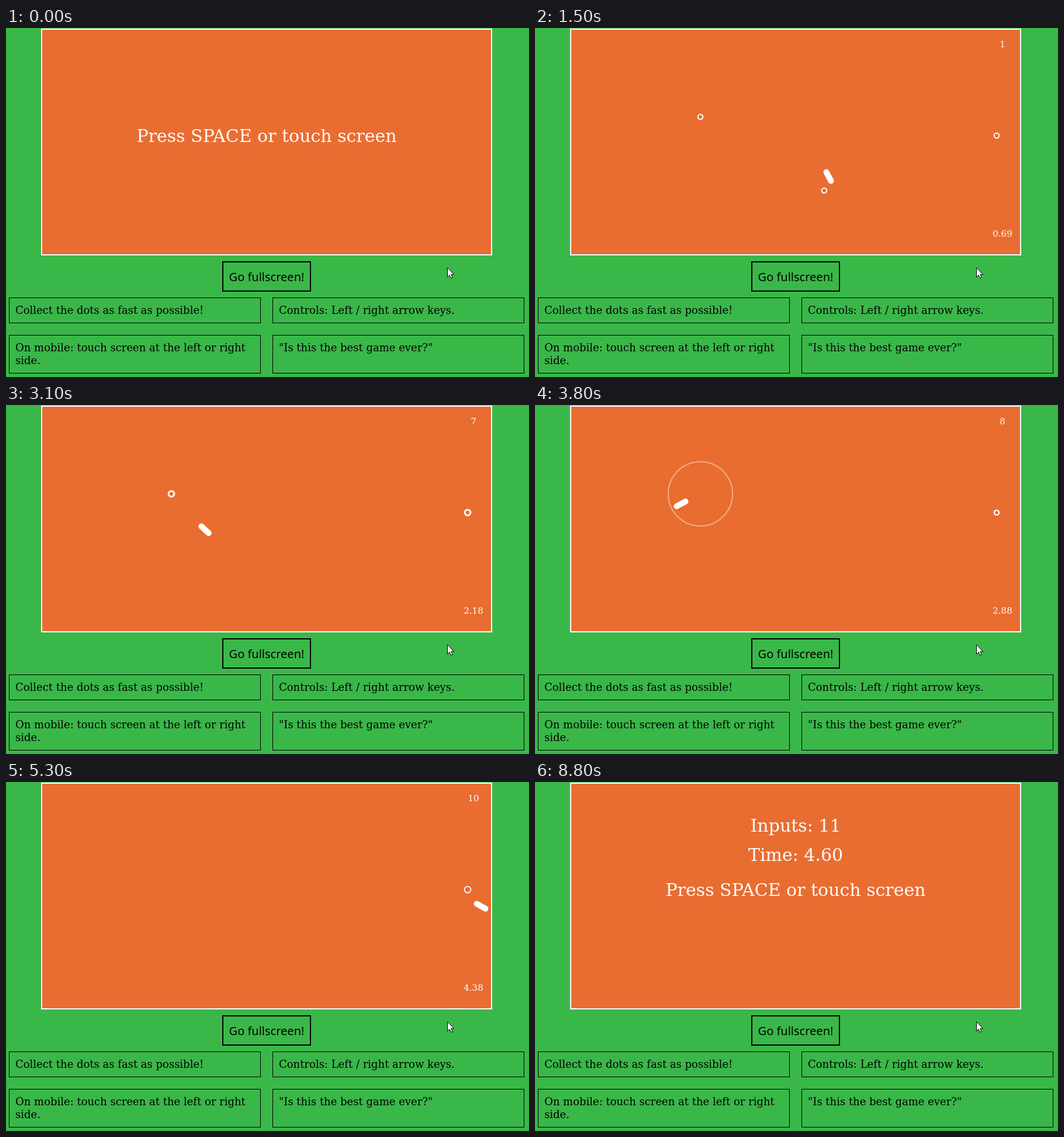
These frames come from a looping animation (895 by 597 pixels, 9.5 s). An HTML page:

```html
<!DOCTYPE html>
<html lang="en">
<head>
<meta charset="utf-8">
<title>Collect the dots</title>
<style>
  html, body { margin: 0; width: 100%; height: 100%; overflow: hidden; background: #3ab749; }
  svg { display: block; width: 895px; height: 597px; }
  text { font-family: "DejaVu Serif", serif; white-space: pre; }
  .page text { font-size: 18px; }
  .page rect { fill: none; stroke: #000; }
  .page .button { font: 20px "Noto Sans", sans-serif; text-anchor: middle; }
  .game text { fill: #fff; text-anchor: middle; }
  .big { font-size: 30px; }
  .small { font-size: 15px; }
  .white { fill: none; stroke: #fff; }
</style>
</head>
<body>
<svg viewBox="0 0 895 597">
  <defs><clipPath id="field"><rect x="62" y="3" width="768" height="384"/></clipPath></defs>
  <rect width="895" height="597" fill="#3ab749"/>
  <rect x="61" y="2" width="770" height="386" fill="#e96d31" stroke="#fff" stroke-width="2"/>

  <g class="game" clip-path="url(#field)">
    <g id="menu" class="big">
      <g id="result">
        <text x="446" y="85">Inputs: 11</text>
        <text x="446" y="135">Time: 4.60</text>
      </g>
      <text x="446" y="195">Press SPACE or touch screen</text>
    </g>
    <g id="play">
      <g id="dots" class="white"></g>
      <g id="player" class="white" stroke-width="10" stroke-linecap="round">
        <path d="M-8.5 0H8.5"/><path d="M-8.5 0H8.5"/>
      </g>
      <text id="inputs" class="small" x="800" y="33"></text>
      <text id="clock" class="small" x="800" y="357"></text>
    </g>
  </g>

  <g class="page">
    <rect x="371" y="400" width="150" height="50" stroke-width="2"/>
    <text class="button" x="446" y="433">Go fullscreen!</text>
    <rect x="5.5" y="461.5" width="430" height="43"/>
    <text x="16" y="489">Collect the dots as fast as possible!</text>
    <rect x="456.5" y="461.5" width="430" height="43"/>
    <text x="467" y="489">Controls: Left / right arrow keys.</text>
    <rect x="5.5" y="525.5" width="430" height="65"/>
    <text x="16" y="553">On mobile: touch screen at the left or right</text>
    <text x="16" y="575">side.</text>
    <rect x="456.5" y="525.5" width="430" height="65"/>
    <text x="467" y="553">"Is this the best game ever?"</text>
  </g>
  <path id="cursor" d="M.5 .5V16.6L4.1 13.2L6.7 18.6L9.2 17.4L6.7 12.2H11.6Z" fill="#fff" stroke="#000"/>
</svg>
<script>
const LOOP = 9500, STEP = 100, START = 900, OVER = 6600, FINISH = 4.6;
const WIDTH = 768, LEFT = 62;
const $ = id => document.getElementById(id);

// Drive segments: end time (s), length (px), turn (rad)
const drive = [
  [0.12, 0, 0], [0.41, 45, 1.08], [0.69, 42, 0],
  [1.385, 116, 2.81], [2.18, 133, 0],
  [2.544, 57, 0], [2.87, 51, -1.24], [3.48, 96.3, 0],
  [3.793, 46.6, 0], [4.067, 41, 1], [4.41, 51.6, 0], [FINISH, 25, 0.55]
];
const presses = [0.12, 0.7, 0.95, 1.2, 1.38, 1.7, 2.05, 2.54, 3.79, 4.05, 4.41];
const dots = [[495, 278, 0.85], [283, 152, 2.68], [790, 184, 4.6]]
  .map(([x, y, taken]) => {
    const el = document.createElementNS('http://www.w3.org/2000/svg', 'circle');
    el.setAttribute('cx', x);
    el.setAttribute('cy', y);
    $('dots').append(el);
    return { el, taken };
  });

const show = (el, on) => el.setAttribute('visibility', on ? 'inherit' : 'hidden');

// The recorded clock stalls briefly between 2400 and 2700 ms
function gameTime(t) {
  if (t < 2700) return (Math.min(t, 2400) - 810) / 1000;
  return (t - 920) / 1000;
}

function pose(g) {
  let x = 446, y = 195, h = 0, from = 0;
  for (const [end, length, turn] of drive) {
    const k = Math.min(1, (g - from) / (end - from));
    const len = length * k, a = turn * k;
    if (turn) {
      const r = len / a || 0;
      x += r * (Math.sin(h + a) - Math.sin(h));
      y += r * (Math.cos(h) - Math.cos(h + a));
    } else {
      x += len * Math.cos(h);
      y += len * Math.sin(h);
    }
    h += a;
    if (g <= end) break;
    from = end;
  }
  return { x, y, h };
}

function drawDot({ el, taken }, g, t) {
  const age = g - taken;
  let r, line, alpha = 1;
  if (age < 0) {
    const outer = 6 + 0.8 * Math.sin((g - 2.18) / 0.44 * 2 * Math.PI + 0.4);
    line = 2.35 + 0.7 * Math.cos((g - 2) * Math.PI / 2);
    r = outer - line / 2;
  } else {
    r = 5 + 250 * age;
    line = 2;
    alpha = 1 - age / 0.36;
  }
  show(el, alpha > 0 && t < 5800);
  el.setAttribute('r', r);
  el.setAttribute('stroke-width', line);
  el.setAttribute('opacity', Math.max(0, alpha));
}

function drawGame(t) {
  const g = gameTime(t), shown = Math.min(g, FINISH);
  const { x, y, h } = pose(shown);
  const wrapped = LEFT + ((x - LEFT) % WIDTH + WIDTH) % WIDTH;
  const other = wrapped < LEFT + WIDTH / 2 ? wrapped + WIDTH : wrapped - WIDTH;
  [wrapped, other].forEach((px, i) => $('player').children[i]
    .setAttribute('transform', `translate(${px} ${y}) rotate(${h * 180 / Math.PI})`));
  dots.forEach(dot => drawDot(dot, g, t));
  $('inputs').textContent = presses.filter(p => p <= shown).length;
  $('clock').textContent = shown.toFixed(2);
}

function drawCursor(t) {
  const path = [0.04, 0.2, 0.5, 0.8, 1];
  const k = path[(t - 8300) / STEP] || 0;
  $('cursor').setAttribute('transform', `translate(${755 - 522 * k} ${409.5 - 409.5 * k})`);
}

function draw(ms) {
  const t = Math.floor(ms % LOOP / STEP) * STEP;
  const playing = t >= START && t < OVER;
  show($('menu'), !playing);
  show($('result'), t >= OVER);
  show($('play'), playing);
  if (playing) drawGame(t);
  drawCursor(t);
}

const origin = performance.now();
function tick() {
  draw(performance.now() - origin);
  requestAnimationFrame(tick);
}
tick();
</script>
</body>
</html>
```
